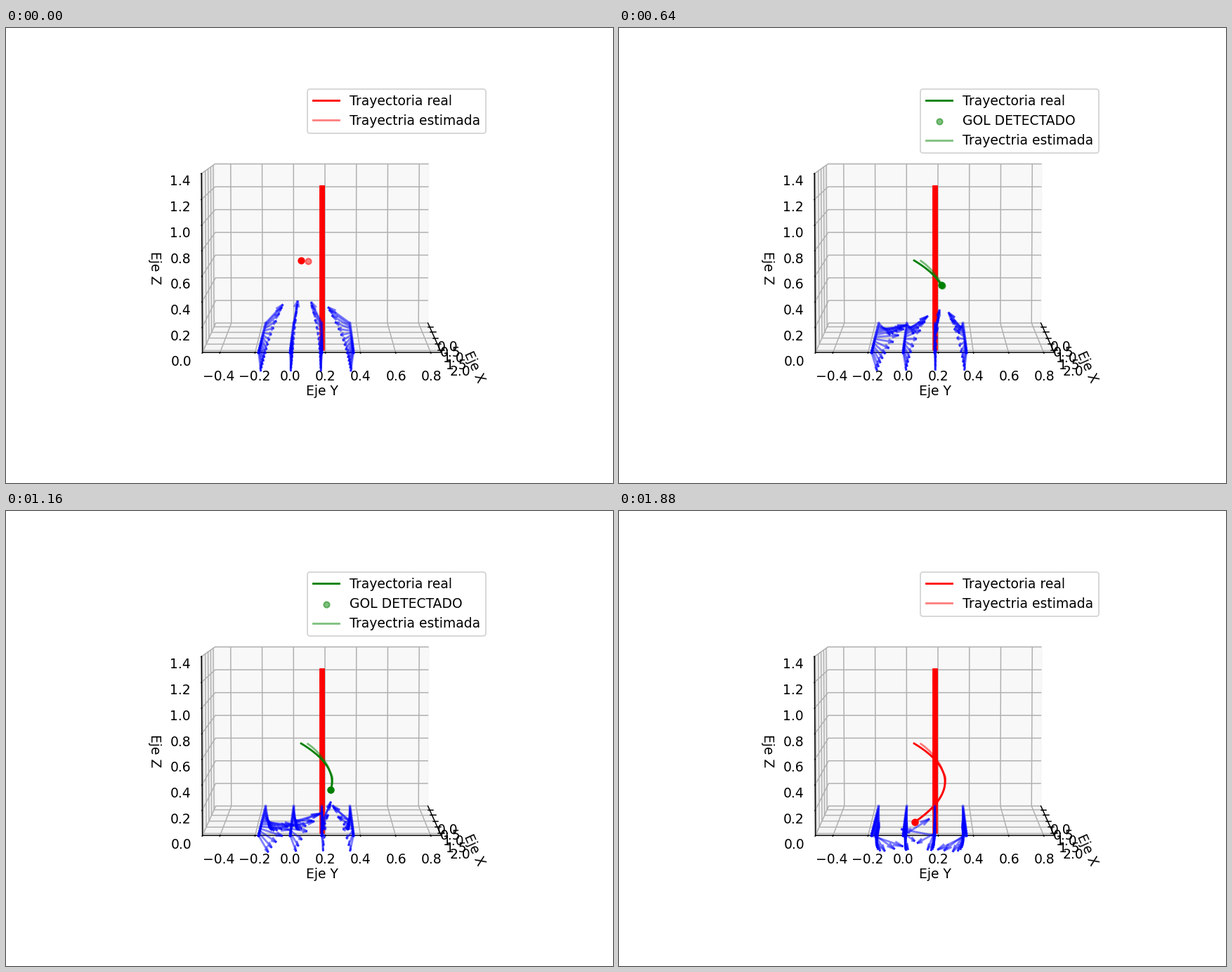
A matplotlib script that plays this animation: 864x648 px, repeating every 1920 ms.

```python
import numpy as np
import matplotlib.pyplot as plt
from matplotlib.animation import FuncAnimation

FRAMES = 48
STEP_MS = 40
GOAL_Y = 0.18
PITCH = 0.18           # sensor spacing
BALL_R = 0.03

fig = plt.figure(figsize=(6.4, 4.8), dpi=135)
ax = fig.add_subplot(projection="3d")
ax.view_init(elev=5, azim=0)
ax.set(xlim=(-0.36, 2.16), ylim=(-0.5, 0.86), zlim=(0, 1.4),
       xlabel="Eje X", ylabel="Eje Y", zlabel="Eje Z")

# Goal frame: two posts and the crossbar
goal = [((0, 0), (0, 1.2)), ((1.8, 1.8), (0, 1.2)), ((0, 1.8), (1.2, 1.2))]
for xs, zs in goal:
    ax.plot(xs, [GOAL_Y, GOAL_Y], zs, color="red", linewidth=4)

# Sensor grid on the floor
gx, gy = np.meshgrid(PITCH * np.arange(-2, 13), PITCH * np.arange(-1, 3))
sensors = np.array([gx.ravel(), gy.ravel(), np.zeros(gx.size)])
ax.scatter(*sensors, color="blue", s=2)

# Ball path and its estimate, which settles onto the path
u = np.linspace(0, 1, FRAMES)
ms = STEP_MS * np.arange(FRAMES)
real = np.array([
    -0.36 + 2.52 * u,
    0.2415 - 0.739 * (u - 0.512) ** 2,
    0.553 - 0.446 * u,
])
error = np.array([
    np.zeros(FRAMES),
    0.043 * np.clip(1 - ms / 700, 0, 1)
    + 0.005 * np.exp(-((ms - 860) / 90) ** 2),
    -0.003 * np.exp(-ms / 100) - 0.012 * np.exp(-((ms - 400) / 250) ** 2),
])
estimate = real + error


def dipole(ball):
    """Field direction of a vertical dipole at every sensor."""
    r = sensors - ball[:, None]
    field = 3 * r[2] * r / (r ** 2).sum(axis=0)
    field[2] -= 1
    return field


drawn = []


def update(i):
    while drawn:
        drawn.pop().remove()
    inside = real[1, i] > GOAL_Y + BALL_R
    color = "green" if inside else "red"
    past = slice(0, i + 1)

    drawn.append(ax.quiver(*sensors, *dipole(real[:, i]), length=0.2,
                           normalize=True, color="blue", alpha=0.5))
    drawn.extend(ax.plot(*real[:, past], color=color,
                         label="Trayectoria real"))
    drawn.append(ax.scatter(*real[:, i], color=color))
    drawn.append(ax.scatter(*estimate[:, i], color=color, alpha=0.5,
                            label="GOL DETECTADO" if inside else None))
    drawn.extend(ax.plot(*estimate[:, past], color=color, alpha=0.5,
                         label="Trayectria estimada"))
    ax.legend(loc="upper right")
    return drawn


anim = FuncAnimation(fig, update, frames=FRAMES, interval=STEP_MS,
                     repeat=True, repeat_delay=0)
plt.show()
```
